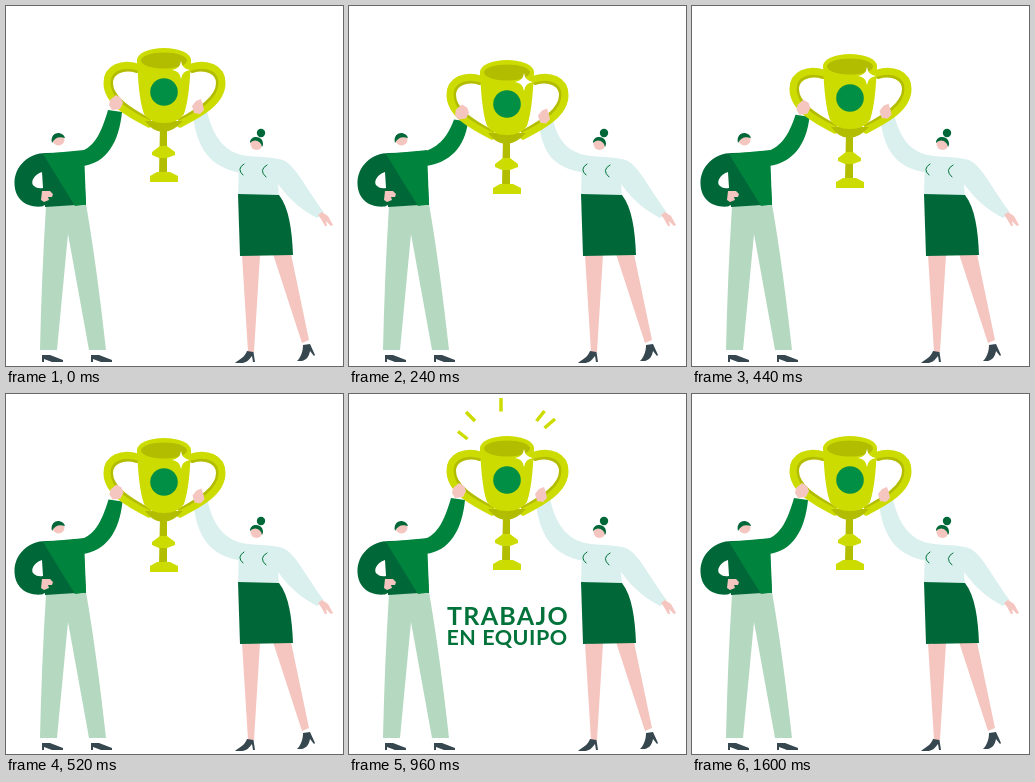
Write an HTML page that moves like this. It is 337x360 px and loops after 1800 ms.

```html
<!DOCTYPE html>
<html lang="es">
<head>
<meta charset="utf-8">
<title>Trabajo en equipo</title>
<style>
html, body { margin: 0; width: 100%; height: 100%; overflow: hidden; background: #fff; }
svg { display: block; width: 100vw; height: 100vh; }
text { font-family: Lato, "Open Sans", sans-serif; font-weight: 700; fill: #00723a; }
.green { fill: #00843d; }
.deep { fill: #006838; }
.skin { fill: #f5c6c0; }
.mint { fill: #daf0ee; }
.shoe { fill: #36474f; }
.lime { fill: #cddc00; }
.olive { fill: #b3bd00; }
.line { fill: none; stroke-linecap: round; }
</style>
</head>
<body>
<svg viewBox="0 0 337 360">
  <g id="rays" stroke="#cddc00" stroke-width="3.500">
    <path d="M109 37.500 118.500 45"/>
    <path d="M117 18 126 27"/>
    <path d="M152 4V17.500"/>
    <path d="M195.500 17 187.500 27"/>
    <path d="M206 25 195.500 34"/>
  </g>

  <g id="man">
    <path fill="#b5d9c0" d="M40 200 80 198C88 244 95 298 100 344H83L62 228 51 344H34C35 296 37 248 40 200Z"/>
    <g class="shoe">
      <path id="shoe" d="M36 349H44L57 354V356H46L38 353V356H36Z"/>
      <use href="#shoe" x="49"/>
    </g>
    <path class="deep" fill-rule="evenodd" d="M40 147C23 147 8 160 8.500 178C9 193 20 202 36 200.500L46 195 80 199 77 146ZM36 166C27 169 24 177 28 180Q31 183 37 182Z"/>
    <path class="deep" d="M36 149 70 199 39 201Z"/>
    <path class="green" d="M37 148 78 144 80 198.500 69 200Z"/>
    <path id="manArm" class="green"/>
    <path class="skin" d="M36 185 44 185 47 188 46 191 42 191 43 194 38 196 35 194Z"/>
    <circle class="skin" cx="52.500" cy="133.500" r="6"/>
    <path class="deep" d="M46 137C44 129 50 126.500 53 127Q58 128 59 132Q50 129 46 137Z"/>
  </g>

  <g id="woman">
    <path class="skin" d="M236 249H254L248 346H242ZM267 248H285L303 334 296 337Z"/>
    <path class="shoe" d="M229 357C234 353 239 351 241 345L247.500 346 249 356H247L246 350C242 355 240 357 235 357ZM291 355C295 351 297 345 297 339L304 338 309 349 308 350 304 345C303 351 300 354 296 355Z"/>
    <path class="mint" d="M233 149C249 151 266 151 275 153.500C288 157 296 176 317.500 206L311 212C298 205 285 196 272 178L273 191H232Z"/>
    <path id="womanArm" class="mint"/>
    <path class="deep" d="M232 188 273 189C283 202 286 224 287 249L234 250Z"/>
    <path class="skin" d="M312 209 316 206 322 210 327 219 325 220 320 215 321 220 319 220 315 213Z"/>
    <path class="line" stroke="#00743a" d="M238 158Q230 163 237 169M261 159Q252 164 260 171"/>
    <circle class="skin" cx="250.500" cy="138" r="6"/>
    <circle class="deep" cx="255" cy="127" r="4.200"/>
    <path class="deep" d="M244 137C244 130 253 129.500 256 134Q258 138 256 141Q255 135 249 134.500Q246 134.500 244 137Z"/>
  </g>

  <g id="cup">
    <g id="handle" class="line">
      <path stroke="#b3bd00" stroke-width="4" d="M131 65C117 61 105 66 105 77C105 92 124 104 143 114"/>
      <path stroke="#cddc00" stroke-width="7" d="M132 61C116 56 101 62 101 77C101 96 123 108 143 118"/>
    </g>
    <use href="#handle" transform="matrix(-1 0 0 1 317 0)"/>
    <path class="olive" d="M154 120H161V168H153Z"/>
    <path class="lime" d="M154 140H161L169 146V149L161 152H153L146 149V146ZM151 166H164L172 170V176H144V170Z"/>
    <path class="olive" d="M139 115H177Q167 126 157 126T139 115Z"/>
    <path class="lime" d="M131 54C132 73 133 93 138 108Q144 117 158 117T178 108C183 93 184 73 185 54Z"/>
    <ellipse class="lime" cx="158" cy="54" rx="27" ry="12"/>
    <ellipse class="olive" cx="158" cy="54.500" rx="23" ry="8"/>
    <circle cx="158" cy="86" r="13.800" fill="#008f45"/>
    <path fill="#fff" d="M175 55Q176 63 184 64Q176 65 175 73Q174 65 166 64Q174 63 175 55Z"/>
  </g>

  <g id="hands" class="skin">
    <path d="M104 94 110 89 115 92 117 97 114 103 106 104 103 99Z"/>
    <path d="M186 100 190 95 195 93 197 99 198 104 194 108 188 107Z"/>
  </g>

  <text id="top" x="98" y="231" font-size="25" letter-spacing="1.300">TRABAJO</text>
  <text id="bottom" x="97.500" y="250.500" font-size="21.500" letter-spacing=".5">EN EQUIPO</text>
</svg>
<script>
const LOOP = 1800, STEP = 40;
const DIP = 560, DEPTH = 14;
const RAYS_IN = 560, RAYS_OUT = 1280;
const TOP_IN = 640, BOTTOM_IN = 960, TEXT_OUT = 1600;

const $ = id => document.getElementById(id);
const rays = [...$("rays").children];

function show(el, on) {
  el.style.display = on ? "" : "none";
}

// Straight down and back up at constant speed
function dropAt(t) {
  return DEPTH * Math.max(0, 1 - Math.abs(t * 2 / DIP - 1));
}

function drawLift(d) {
  const x = d * 0.25, y = d * 0.8;
  $("cup").setAttribute("transform", `translate(0 ${d})`);
  $("hands").setAttribute("transform", `translate(${x} ${y})`);
  $("manArm").setAttribute("d",
    `M70 147C88 143 ${95 + x} ${128 + y / 2} ${102 + x} ${104 + y}L${116 + x} ${106 + y}` +
    `C${113 + x} ${137 + y / 2} 100 157 77 160Z`);
  $("womanArm").setAttribute("d",
    `M240 150C216 146 ${206 + x} ${127 + y / 2} ${201 + x} ${105 + y}L${187 + x} ${110 + y}` +
    `C${191 + x} ${141 + y / 2} 203 162 236 167Z`);
}

// Rays come in left to right and leave right to left
function drawRays(t) {
  rays.forEach((ray, i) => {
    const last = rays.length - 1 - i;
    show(ray, t >= RAYS_IN + i * STEP && t < RAYS_OUT + last * STEP);
  });
}

function draw(now) {
  const t = Math.floor(now % LOOP / STEP) * STEP;
  drawLift(dropAt(t));
  drawRays(t);
  show($("top"), t >= TOP_IN && t < TEXT_OUT);
  show($("bottom"), t >= BOTTOM_IN && t < TEXT_OUT);
}

const start = performance.now();
function tick() {
  draw(performance.now() - start);
  requestAnimationFrame(tick);
}
tick();
</script>
</body>
</html>
```
